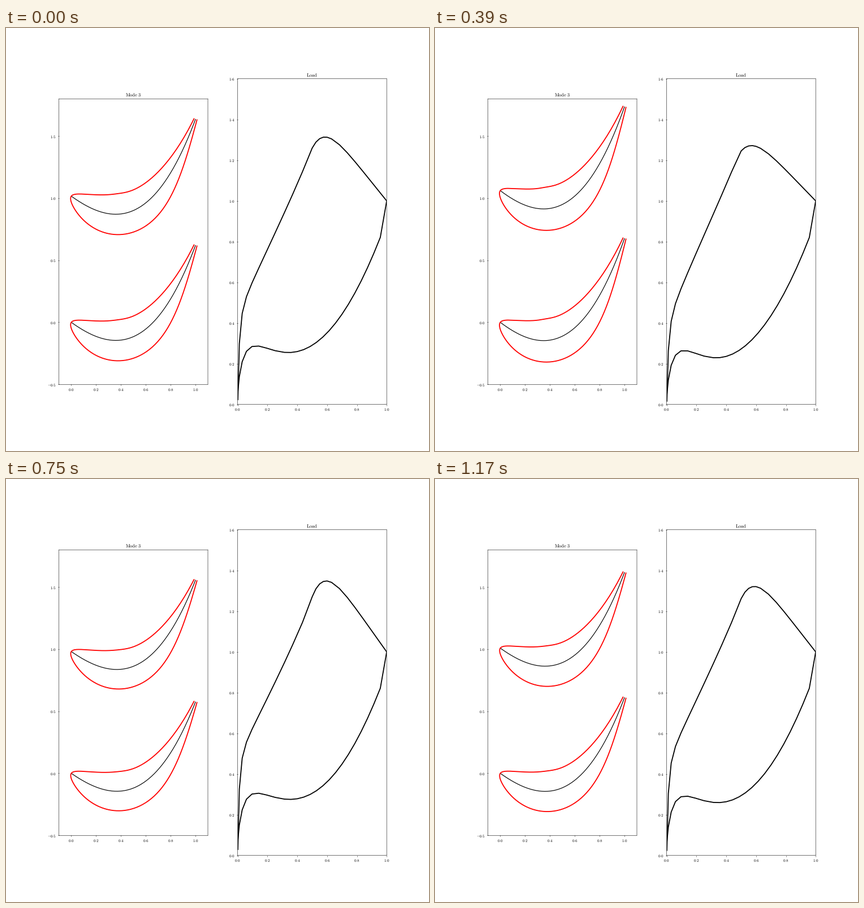
These frames come from a looping animation (748x748 px, 1.2 s). A matplotlib script:

```python
import numpy as np
import matplotlib.pyplot as plt
from matplotlib.animation import FuncAnimation

FRAMES = 40
INTERVAL = 30

plt.rcParams.update({
    "mathtext.fontset": "cm",
    "text.hinting": "none",
    "path.snap": False,
})

chord = np.linspace(0, 1, 160) ** 2

# Load stations: cosine spacing at the nose, even steps further back
nose = (1 - np.cos(.07 + .14 * np.arange(9))) / 2
upper_front = np.r_[nose, .37, .435]
upper_rear = np.r_[np.linspace(.5, .6, 5), np.linspace(.63, 1, 8)]
lower_body = np.r_[nose, np.linspace(.357, 1, 16)[:-1]]


def blade(s):
    """Camber line and open-tailed outline for mode amplitude s."""
    x = chord
    a, b, c = -.72 - .04 * s, .617 + .095 * s, .722 + .0075 * s
    y = a * x + b * x**2 + c * x**3
    angle = np.arctan(a + 2 * b * x + 3 * c * x**2)
    shape = (.255 + .67 * x - .63 * x**2) * (1 + .064 * s)
    t = np.sqrt(x) * (1 - x) * shape + .0128 * x
    dx, dy = t * np.sin(angle), t * np.cos(angle)
    outline_x = np.r_[(x - dx)[::-1], (x + dx)[1:]]
    outline_y = np.r_[(y + dy)[::-1], (y - dy)[1:]]
    return y, outline_x, outline_y


def upper_load(s):
    """Steep nose, straight climb, then a rounded peak falling to 1."""
    x, u = upper_front, 1 - upper_rear
    climb = .449 + 1.565 * x + .9 * x**5 - .552 * np.exp(-28 * x**.7)
    gain = (.05 - .21 * x + .23 * x**2) * (1 - np.exp(-150 * x))
    peak = 1 + (.91 - .172 * s) * u - (12.5 - 4.5 * s) * u**6
    return np.r_[x, upper_rear], np.r_[climb - gain * s, peak]


def lower_load(s):
    """Parabola with a dip at the nose and a jump to 1 at the tail."""
    x = lower_body
    y = .259 + 1.55 * (x - .355)**2 - .41 * np.exp(-10.8 * x**.8)
    y -= .03 * s * np.exp(-((x - .27) / .37)**2)
    return np.r_[x, 1], np.r_[y, 1]


def style(ax, title, xticks, yticks):
    ax.set_title(r"$\mathrm{%s}$" % title, fontsize=12)
    ax.set_xticks(xticks, [f"${v:.1f}$" for v in xticks])
    ax.set_yticks(yticks, [f"${v:.1f}$" for v in yticks])


def line_pair(ax, color, width):
    return [ax.plot([], [], color, lw=width)[0] for _ in range(2)]


fig, (ax_blade, ax_load) = plt.subplots(1, 2, figsize=(14.96, 14.96), dpi=50)
ax_blade.set_aspect("equal")
style(ax_blade, r"Mode\ 3", np.arange(6) / 5, np.arange(-1, 4) / 2)
style(ax_load, "Load", np.arange(6) / 5, np.arange(9) / 5)
ax_blade.set(xlim=(-.1, 1.1), ylim=(-.5, 1.8))
ax_load.set(xlim=(0, 1), ylim=(0, 1.6))

cambers = line_pair(ax_blade, "k", 1.7)
outlines = line_pair(ax_blade, "r", 2.6)
loads = line_pair(ax_load, "k", 2.6)


def update(i):
    s = np.sin(2 * np.pi * i / FRAMES)
    y, outline_x, outline_y = blade(s)
    pitch = 1.016 + .05 * s
    for camber, outline, offset in zip(cambers, outlines, (0, pitch)):
        camber.set_data(chord, y + offset)
        outline.set_data(outline_x, outline_y + offset)
    loads[0].set_data(*upper_load(s))
    loads[1].set_data(*lower_load(s))
    return cambers + outlines + loads


anim = FuncAnimation(fig, update, frames=FRAMES, interval=INTERVAL,
                     repeat=True, repeat_delay=0)
plt.show()
```
